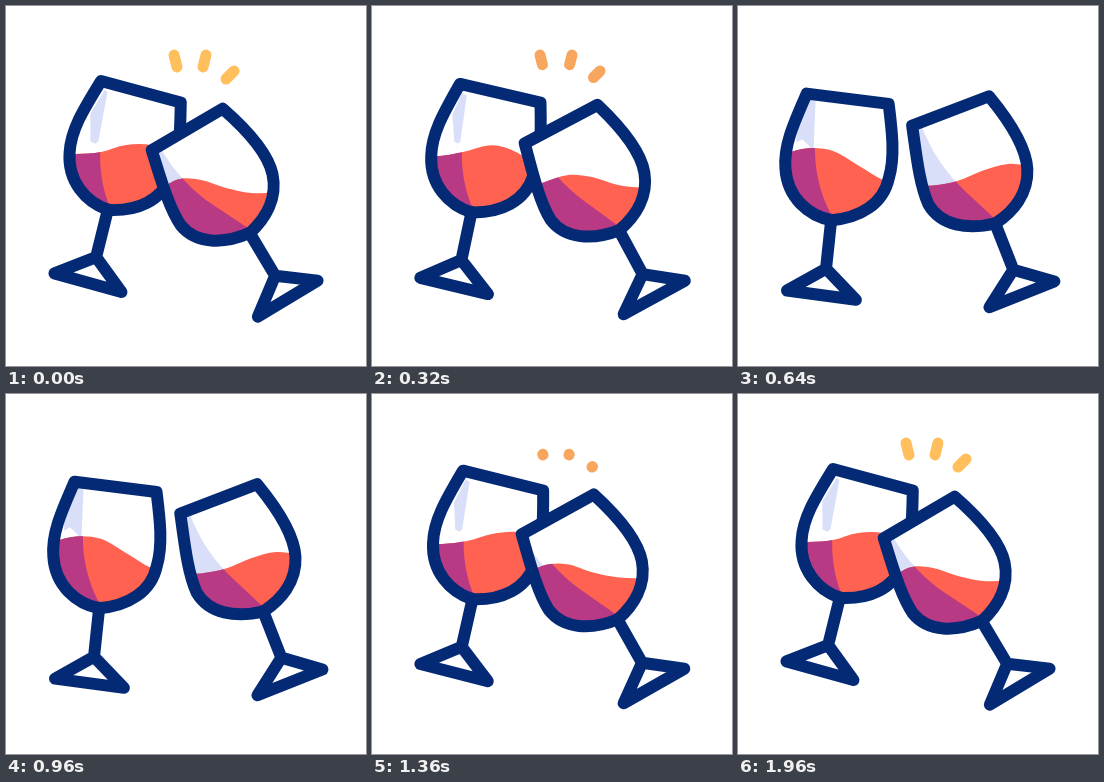
An HTML page that plays this animation: 360x360 px, repeating every 2000 ms.

```html
<!DOCTYPE html>
<html lang="en">
<head>
<meta charset="utf-8">
<title>Cheers</title>
<style>
  html, body { margin: 0; width: 100%; height: 100%; overflow: hidden; background: #fff; }
  svg { display: block; width: 100vw; height: 100vh; }
  .line { fill: none; stroke: #052a75; stroke-width: 12; stroke-linecap: round; stroke-linejoin: round; }
  .shine { fill: #d9dff9; }
  .wine { fill: #ff6250; }
  .shade { fill: #b83a85; }
  #sparks { fill: none; stroke-width: 11; stroke-linecap: round; }
</style>
</head>
<body>
<svg id="stage" viewBox="0 0 360 360"></svg>
<script>
const LOOP = 2000;
const stage = document.getElementById('stage');

// Glasses are drawn in their parted pose; waves hold surface heights at even x steps.
const glasses = [
  {
    pivot: [173, 272], swing: 8.1,
    bowl: 'M68,88 C55,118 45,140 47,163 C49,192 70,210 93,214.5 C122,212 145,198 150.5,172 C157,150 153,122 150,98 Z',
    foot: 'M93,214 L88,263 L49,285 L118,294 L88,263',
    dark: 'M30,60 L77,60 L76.5,142 C76,168 84,195 96,214 L30,230 Z',
    x0: 45,
    waves: {
      touch: [147, 148, 146, 139, 139, 148],
      leave: [149, 150, 145, 139, 146, 166],
      apart: [148, 142, 145, 160, 175, 182],
      near: [150, 149, 142.5, 142, 156, 173],
      clink: [149, 150, 147, 140, 138, 144]
    }
  },
  {
    pivot: [309, 304], swing: -9.7,
    bowl: 'M175,119 L252,90 C270,112 289,140 290,163 C291,188 275,206 258,217 C230,224 203,219 191,198 C182,178 179,148 175,119 Z',
    foot: 'M257.5,217 L275.5,263.5 L316.5,275.5 L251.5,301 L275.5,263.5',
    dark: 'M178,108 L184,118 C194,146 210,168 227,184 L260,215 L150,235 Z',
    x0: 145,
    waves: {
      touch: [192, 174, 174, 182, 187, 186, 180],
      leave: [186, 177, 169, 171, 179, 182, 180],
      apart: [180, 180, 180, 175, 164, 157, 160],
      near: [184, 176, 170, 167.5, 169, 173, 178],
      clink: [186, 172, 170, 178, 183, 184, 182]
    }
  }
];

// Outline of the left glass's reflection at three amounts of parting.
const streakKeys = [
  [0, [73, 96, 76, 98, 74, 148, 71, 151, 66, 149, 64, 135, 62, 122]],
  [0.635, [68, 98, 76, 99, 75, 140, 74, 142, 72, 141, 69, 127, 66, 117]],
  [1, [67, 93, 77, 95, 75, 146, 70, 140, 63, 133, 57, 138, 57, 128]]
];
// Each spark runs from its outer end to its inner end.
const sparks = [[168, 49, 171, 61], [200, 49, 197, 61], [228, 65, 220, 73]];

const clamp = v => Math.min(1, Math.max(0, v));
const mix = (a, b, k) => a + (b - a) * k;
const mixAll = (a, b, k) => a.map((v, i) => mix(v, b[i], k));
const progress = (t, from, to) => clamp((t - from) / (to - from));
const smooth = u => u * u * (3 - 2 * u);

function keyed(keys, p) {
  let i = 1;
  while (i < keys.length - 1 && p > keys[i][0]) i++;
  const [a, from] = keys[i - 1], [b, to] = keys[i];
  return mixAll(from, to, progress(p, a, b));
}

// cubic-bezier(.7, 0, .3, 1)
function strongEase(u) {
  let lo = 0, hi = 1;
  for (let i = 0; i < 24; i++) {
    const s = (lo + hi) / 2, r = 1 - s;
    if (2.1 * s * r * r + 0.9 * s * s * r + s * s * s < u) lo = s; else hi = s;
  }
  return smooth(lo);
}

const apartAt = t => strongEase(progress(t, 0, 780)) - strongEase(progress(t, 830, 1640));

const wave = (w, p, rising) => keyed(rising
  ? [[0, w.touch], [0.24, w.leave], [1, w.apart]]
  : [[0, w.touch], [0.15, w.clink], [0.635, w.near], [1, w.apart]], p);

function winePath(x0, ys) {
  const step = 25, third = step / 3;
  const slope = i => {
    const a = Math.max(0, i - 1), b = Math.min(ys.length - 1, i + 1);
    return (ys[b] - ys[a]) / (b - a) / 3;
  };
  let d = `M${x0},${ys[0]}`;
  for (let i = 1; i < ys.length; i++) {
    const x = x0 + i * step;
    d += ` C${x - step + third},${ys[i - 1] + slope(i - 1)} ${x - third},${ys[i] - slope(i)} ${x},${ys[i]}`;
  }
  return `${d} V260 H${x0} Z`;
}

stage.innerHTML = glasses.map((g, i) => `
  <clipPath id="bowl${i}"><path d="${g.bowl}"/></clipPath>
  <clipPath id="dark${i}"><path d="${g.dark}"/></clipPath>
  <g id="glass${i}">
    <path d="${g.bowl}" fill="#fff"/>
    <g clip-path="url(#bowl${i})">
      ${i ? `<path class="shine" id="wedge" d="${g.dark}"/>` : '<polygon class="shine" id="streak"/>'}
      <path class="wine level"/>
      <g clip-path="url(#dark${i})"><path class="shade level"/></g>
    </g>
    <path class="line" d="${g.bowl}"/>
    <path class="line" d="${g.foot}"/>
  </g>`).join('') + '<path id="sparks"/>';

const streak = document.getElementById('streak');
const wedge = document.getElementById('wedge');
const sparkPath = document.getElementById('sparks');
glasses.forEach((g, i) => {
  g.node = document.getElementById('glass' + i);
  g.levels = g.node.querySelectorAll('.level');
});

function drawSparks(t) {
  const leaving = t < 800;
  sparkPath.style.display = t < 480 || t > 1330 ? '' : 'none';
  // Sparks retract to their outer ends, then grow back from the inner ones.
  const from = leaving ? 0 : 1 - smooth(progress(t, 1320, 1600));
  const to = leaving ? 1 - smooth(progress(t, 260, 480)) : 1;
  sparkPath.setAttribute('d', sparks.map(([x1, y1, x2, y2]) => {
    const at = k => `${mix(x1, x2, k)},${mix(y1, y2, k)}`;
    return `M${at(from)} L${at(to)}`;
  }).join(' '));
  const warm = leaving ? progress(t, 0, 320) : 1 - progress(t, 1360, 1800);
  const color = mixAll([255, 191, 92], [248, 165, 94], warm);
  sparkPath.setAttribute('stroke', `rgb(${color})`);
}

function drawShine(p) {
  streak.setAttribute('points', keyed(streakKeys, p).join(' '));
  // The right reflection slips behind the rim while the glass is halfway.
  const hidden = progress(p, 0.1, 0.24) * (1 - progress(p, 0.65, 0.95));
  wedge.setAttribute('transform', `translate(${-30 * hidden} 0)`);
}

function draw(t) {
  const p = apartAt(t);
  for (const g of glasses) {
    const angle = g.swing * (1 - p), center = g.pivot.join(' ');
    g.node.setAttribute('transform', `rotate(${angle} ${center})`);
    const d = winePath(g.x0, wave(g.waves, p, t < 805));
    for (const level of g.levels) {
      level.setAttribute('d', d);
      // The surface stays in stage space while its glass tilts.
      level.setAttribute('transform', `rotate(${-angle} ${center})`);
    }
  }
  drawShine(p);
  drawSparks(t);
}

const begin = performance.now();
function frame(now) {
  draw(Math.max(0, now - begin) % LOOP);
  requestAnimationFrame(frame);
}
draw(0);
requestAnimationFrame(frame);
</script>
</body>
</html>
```
